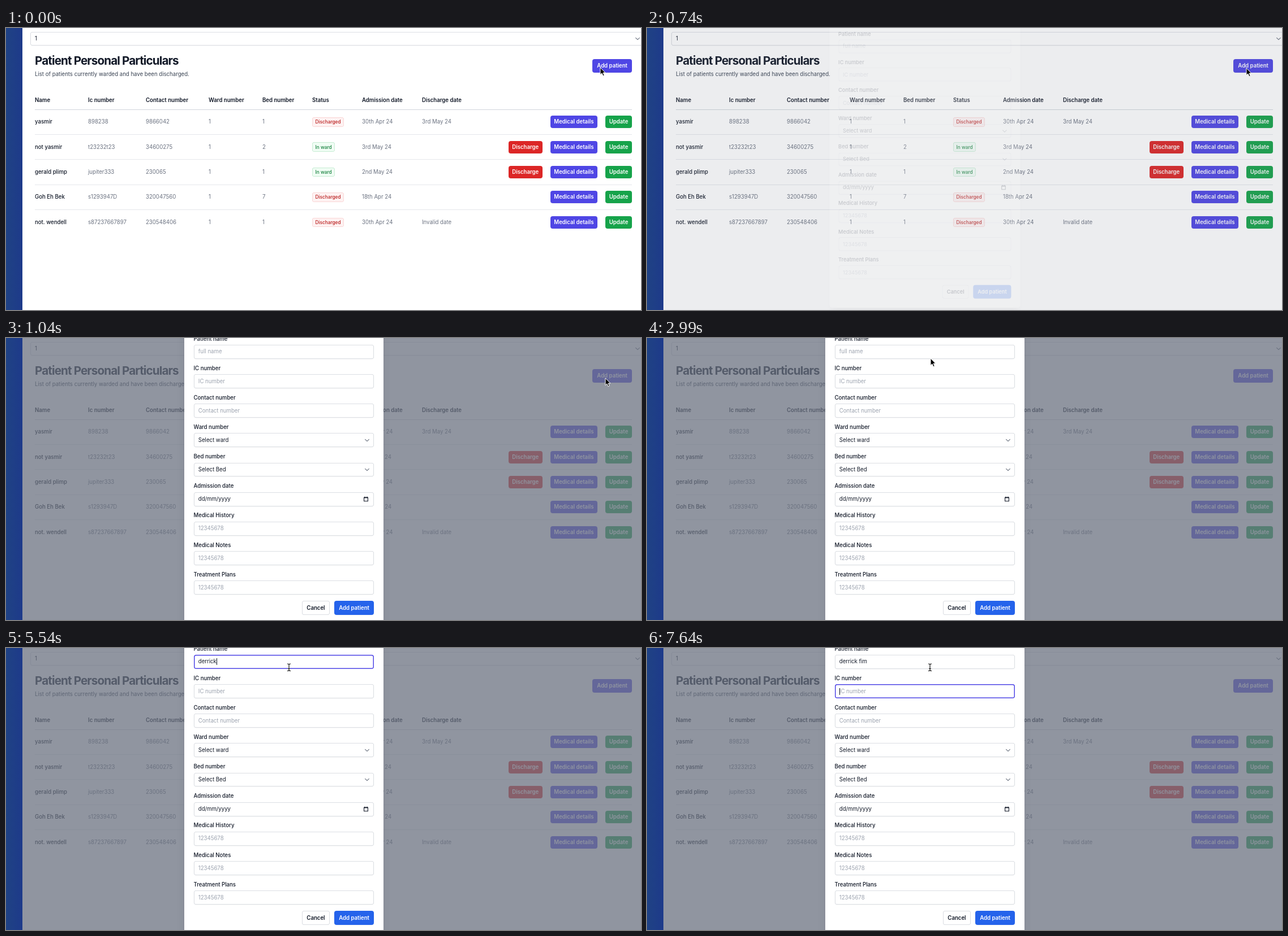
An HTML page for the animation above (8000 ms loop, 1122x499 px).

```html
<!DOCTYPE html>
<html lang="en">
<head>
<meta charset="utf-8">
<title>Patient list</title>
<style>
  html, body { margin: 0; width: 100%; height: 100%; overflow: hidden; background: #fff; }
  #stage { position: relative; width: 1122px; height: 499px; overflow: hidden;
    font: 400 9.625px/20px Inter, sans-serif; color: #111827; }
  #stage div, #stage svg { position: absolute; white-space: pre; }
  #page, #form, #shade { inset: 0; }
  #shade { left: 29px; background: #6b7280; }
  #form { transform-origin: 491px 217px; }
  .side { background: linear-gradient(90deg, #1f4284, #1e3a8a); }
  .title { font-size: 20.625px; font-weight: 700; letter-spacing: -.043em; font-optical-sizing: none; }
  .semi { font-weight: 600; }
  .medium { font-weight: 500; }
  .body { color: #374151; }
  .cell { color: #6b7280; }
  .hint { color: #9ca3af; }
  .line { background: #e5e7eb; }
  .head.line { background: #d1d5db; }
  .btn, .badge { display: flex; align-items: center; justify-content: center; border-radius: 4.1px; }
  .btn { color: #fff; font-weight: 600; box-shadow: 0 .7px 1.4px rgb(0 0 0 / .05); }
  .indigo { background: #4f46e5; }
  .indigo.hover { background: #6366f1; }
  .green { background: #16a34a; }
  .red { background: #dc2626; }
  .blue { background: #2563eb; }
  .plain { color: #111827; background: #fff; box-shadow: inset 0 0 0 .8px #d1d5db; }
  .badge { font-size: 8.25px; font-weight: 500; }
  .out { color: #b91c1c; background: #fef2f2; box-shadow: inset 0 0 0 .7px rgb(220 38 38 / .18); }
  .in { color: #15803d; background: #f0fdf4; box-shadow: inset 0 0 0 .7px rgb(22 163 74 / .25); }
  .field { background: #fff; border-radius: 4.1px;
    box-shadow: inset 0 0 0 .8px #d1d5db, 0 .7px 1.4px rgb(0 0 0 / .05); }
  .field.focus { box-shadow: inset 0 0 0 1.5px #4f46e5; }
  .panel { background: #fff; border-radius: 5.5px;
    box-shadow: 0 14px 17px -3.4px rgb(0 0 0 / .1), 0 5.5px 7px -4px rgb(0 0 0 / .1); }
  .caret { background: #111827; }
  svg { overflow: visible; fill: none; }
</style>
</head>
<body>
<div id="stage">
  <div id="page"></div>
  <div id="shade"></div>
  <div id="form"></div>
  <svg id="cursor" width="1" height="1">
    <path id="arrow" d="M0 0V12.6L2.9 9.9L5 14.8L7.1 13.9L5.1 9.1H8.9Z" fill="#000" stroke="#fff" stroke-width="1" stroke-linejoin="round"/>
    <path id="hand" d="M-1 1Q0-.6 1 1V5.5Q2 4.6 3 5.7Q4 5 5 6.1Q6.6 5.7 6.8 7.2V10Q6.7 12 5.7 13.2V15H-.7V13.6L-3.8 9.2Q-4.3 7.7-2.8 7.9L-1 9.2Z" fill="#000" stroke="#fff" stroke-width=".9"/>
    <g id="beam">
      <path d="M-3-6Q0-6 0-4.5Q0-6 3-6M0-4.5V5M-3 6.5Q0 6.5 0 5Q0 6.5 3 6.5M-1.7 2.5H1.7" stroke="#fff" stroke-width="2.4"/>
      <path d="M-3-6Q0-6 0-4.5Q0-6 3-6M0-4.5V5M-3 6.5Q0 6.5 0 5Q0 6.5 3 6.5M-1.7 2.5H1.7" stroke="#000" stroke-width="1.1"/>
    </g>
  </svg>
</div>
<script>
const $ = id => document.getElementById(id);
const page = $('page'), form = $('form');

function box(parent, cls, x, y, w, h, label = '') {
  const el = document.createElement('div');
  el.className = cls;
  el.style.cssText = `left:${x}px;top:${y}px;width:${w}px;height:${h}px`;
  el.textContent = label;
  parent.append(el);
  return el;
}

// y is the middle of the capitals
function text(parent, cls, x, y, label) {
  const el = box(parent, cls, x, y - 10, 0, 20, label);
  el.style.width = 'auto';
  return el;
}

function icon(parent, x, y, d, color, width) {
  parent.insertAdjacentHTML('beforeend',
    `<svg style="left:${x}px;top:${y}px" width="1" height="1"><path d="${d}" stroke="${color}" stroke-width="${width}" stroke-linecap="round" stroke-linejoin="round"/></svg>`);
}
const chevron = (parent, x, y) => icon(parent, x, y, 'M-3.4-1.7L0 1.7L3.4-1.7', '#6b7280', 1.05);

// Patient list
box(page, 'side', 0, 0, 29, 499);
box(page, 'field', 43, 6.5, 1090, 24.5);
text(page, '', 51, 19, '1');
chevron(page, 1116, 19);
text(page, 'title', 51, 58, 'Patient Personal Particulars');
text(page, 'body', 51, 82.4, 'List of patients currently warded and have been discharged.');
const addButton = box(page, 'btn indigo', 1036, 54.5, 70.3, 24.75, 'Add patient');

const columns = [51, 145, 247, 358, 453, 541, 629, 735];
['Name', 'Ic number', 'Contact number', 'Ward number', 'Bed number', 'Status', 'Admission date', 'Discharge date']
  .forEach((label, i) => text(page, 'semi', columns[i], 127.7, label));
box(page, 'head line', 51, 144, 1055, 1);

const patients = [
  ['yasmir', '898238', '9866042', '1', '1', 'Discharged', '30th Apr 24', '3rd May 24'],
  ['not yasmir', 't23232t23', '34600275', '1', '2', 'In ward', '3rd May 24', ''],
  ['gerald plimp', 'jupiter333', '230065', '1', '1', 'In ward', '2nd May 24', ''],
  ['Goh Eh Bek', 's1293947D', '320047560', '1', '7', 'Discharged', '18th Apr 24', ''],
  ['not. wendell', 's87237667897', '230548406', '1', '1', 'Discharged', '30th Apr 24', 'Invalid date']
];
patients.forEach((patient, row) => {
  const y = 166.4 + row * 44.35;
  const warded = patient[5] === 'In ward';
  patient.forEach((value, i) => {
    if (i === 5) box(page, 'badge ' + (warded ? 'in' : 'out'), 541, y - 8.3, warded ? 40 : 56, 16.5, value);
    else text(page, i ? 'cell' : 'medium', columns[i], y, value);
  });
  if (warded) box(page, 'btn red', 887.5, y - 11, 60.5, 22, 'Discharge');
  box(page, 'btn indigo', 961.7, y - 11, 83.4, 22, 'Medical details');
  box(page, 'btn green', 1058.8, y - 11, 47.5, 22, 'Update');
  if (row < 4) box(page, 'line', 51, Math.round(y + 21.7), 1055, 1);
});

// Form
box(form, 'panel', 315, -73, 352, 580);
const fields = [
  ['Patient name', 'full name'], ['IC number', 'IC number'], ['Contact number', 'Contact number'],
  ['Ward number', 'Select ward'], ['Bed number', 'Select Bed'], ['Admission date', 'dd/mm/yyyy'],
  ['Medical History', '12345678'], ['Medical Notes', '12345678'], ['Treatment Plans', '12345678']
].map(([label, value], i) => {
  const y = 24.4 + i * 52.16;
  const filled = i > 2 && i < 6;
  text(form, 'medium', 331.5, y - 22.9, label);
  const frame = box(form, 'field', 331.5, y - 12.4, 318.8, 24.75);
  const content = text(form, filled ? '' : 'hint', 339.8, y, value);
  if (i === 3 || i === 4) chevron(form, 638, y);
  if (i === 5) icon(form, 635.7, y, 'M-3.4-3H3.4V3.8H-3.4ZM-3.4-2.2H3.4M-2-4V-3M2-4V-3', '#111827', 1.1);
  return { frame, content };
});
box(form, 'btn plain', 523, 465.3, 49, 24.75, 'Cancel');
box(form, 'btn blue', 580, 465.3, 70.2, 24.75, 'Add patient');
const caret = box(form, 'caret', 340, 18, 1, 12);

// Motion: each table holds its value until the next time
const PERIOD = 8000;
const opening = [[0, 0], [740, .17], [890, .83], [1040, 1]];
const pointer = [
  [0, 1050, 70, 'arrow'], [300, 1058.5, 71, 'hand'], [740, 1058.5, 71, 'arrow'],
  [1340, 800, 68, 'arrow'], [1490, 591, 65, 'arrow'], [1940, 602, 77, 'arrow'],
  [2090, 619, 101, 'arrow'], [2240, 629, 118, 'arrow'], [2390, 610, 110, 'arrow'],
  [2540, 573, 92, 'arrow'], [2690, 533, 70, 'arrow'], [2840, 506, 56, 'arrow'],
  [2990, 500.5, 36, 'arrow'], [3140, 499.5, 34, 'beam']
];
const focus = [[0, -1], [3440, 0], [7640, 1]];
const caretShown = [[0, 0], [3440, 1], [3890, 0], [4340, 1], [6140, 0], [6590, 1]];
const fullName = 'derrick fim';
const typed = [[0, 0], ...Array.from({ length: 7 }, (_, i) => [4640 + i * 150, i + 1]),
  [7040, 8], [7340, 9], [7490, 11]];
const at = (table, t) => table.findLast(step => step[0] <= t);

function render(t) {
  const open = at(opening, t)[1];
  $('shade').style.opacity = .75 * open;
  form.style.opacity = open;
  form.style.transform = open < 1 ? `scale(${.95 + .05 * open})` : 'none';
  addButton.classList.toggle('hover', t >= 300 && t < 740);

  const [, x, y, kind] = at(pointer, t);
  $('cursor').style.left = x + 'px';
  $('cursor').style.top = y + 'px';
  for (const id of ['arrow', 'hand', 'beam']) $(id).style.display = id === kind ? '' : 'none';

  const count = at(typed, t)[1];
  const name = fields[0].content;
  name.textContent = count ? fullName.slice(0, count) : 'full name';
  name.className = count ? '' : 'hint';

  const active = at(focus, t)[1];
  fields.forEach((field, i) => field.frame.classList.toggle('focus', i === active));
  caret.style.opacity = at(caretShown, t)[1];
  caret.style.left = 340 + (active === 0 && count ? name.offsetWidth : 0) + 'px';
  caret.style.top = (active === 1 ? 70.5 : 18) + 'px';
}

const start = performance.now();
function tick() {
  render((performance.now() - start) % PERIOD);
  requestAnimationFrame(tick);
}
tick();
</script>
</body>
</html>
```
